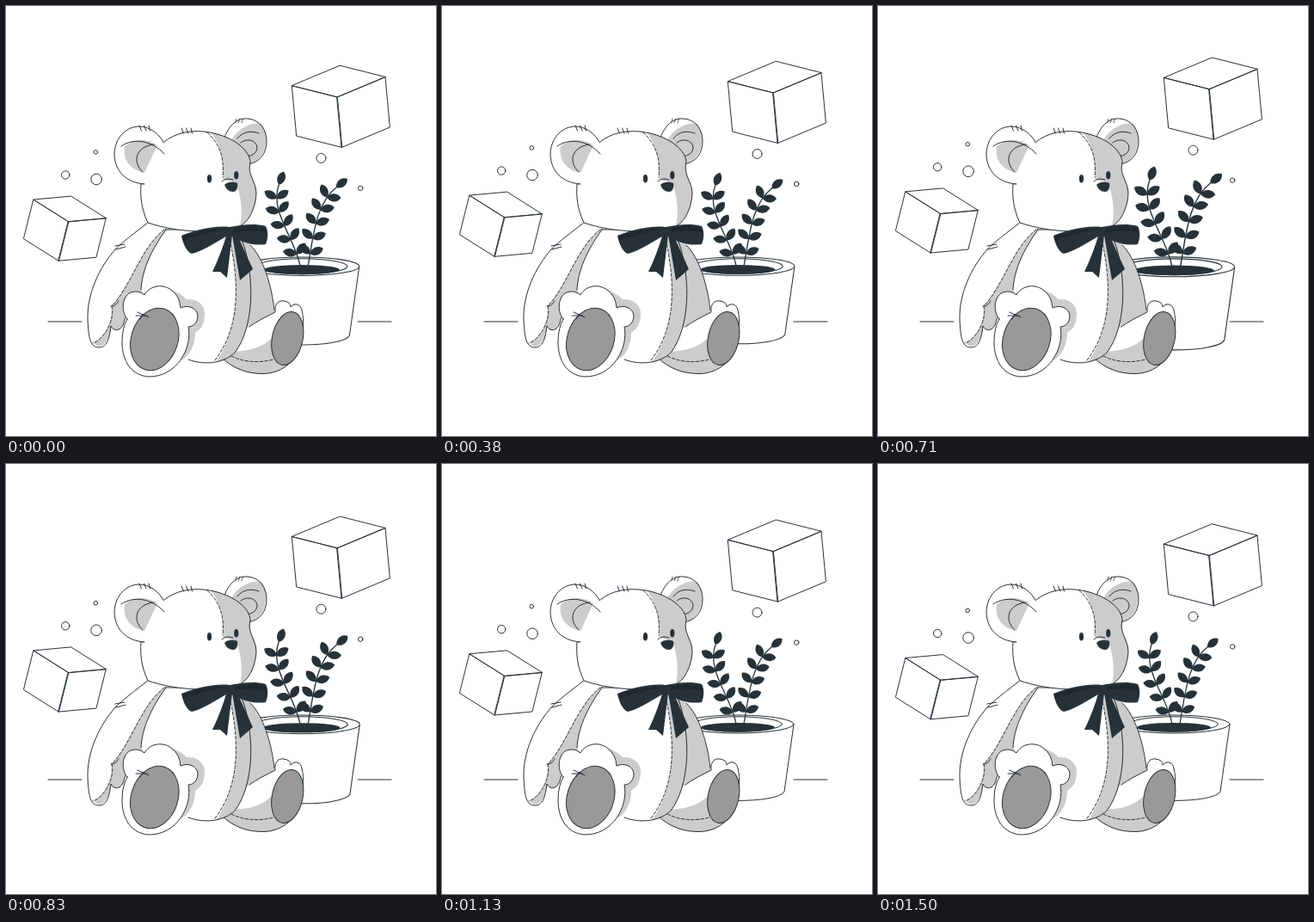
An HTML page for the animation above (1540 ms loop, 500x500 px).

```html
<!DOCTYPE html>
<html lang="en">
<head>
<meta charset="utf-8">
<title>Teddy bear</title>
<style>
  html, body { margin: 0; width: 100%; height: 100%; overflow: hidden; background: #fff; }
  svg { display: block; width: 100%; height: 100%; }
  .line { fill: none; }
  .shade { fill: #000; fill-opacity: .2; stroke: none; }
  .sole { fill: #999; }
  .dark { fill: #263238; stroke: none; }
  .seam { fill: none; stroke-dasharray: 3.5 2.2; }
</style>
</head>
<body>
<svg viewBox="0 0 500 500" fill="#fff" stroke="#263238" stroke-linejoin="round" stroke-linecap="round">
  <defs>
    <path id="tuft" class="line" d="M0 0L2.500 6M5.500 0L8 6M11 0L12.500 6"/>
    <path id="head" d="M184 158C196 148 215 143 237 147C265 152 284 168 284 182C280 196 291 204 291 218C290 237 281 252 272 256C245 265 200 264 165 252C157 235 156 221 157 207H161"/>
    <path id="torso" d="M157 330C158 308 168 285 186 260H270L277 280C289 320 288 372 267 402C254 416 230 418 212 411"/>
    <path id="leg" d="M283 373C291 367 303 361 313 356C312 346 317 342 323 343Q331 344 331 350C336 344 343 347 344 354C347 366 346 380 341 396C336 416 318 427 300 427.500C280 428 264 421 252 410"/>
    <clipPath id="in-head"><use href="#head"/></clipPath>
    <clipPath id="in-torso"><use href="#torso"/></clipPath>
    <clipPath id="in-leg"><use href="#leg"/></clipPath>
  </defs>

  <path class="line" d="M49 367H88M409 367H448"/>

  <g id="floating">
    <g id="cubes"></g>
    <circle cx="69.200" cy="197" r="4.700"/>
    <circle cx="105.100" cy="202" r="6.300"/>
    <circle cx="104.300" cy="170.400" r="2.300"/>
    <circle cx="366.500" cy="177.400" r="5.500"/>
    <circle cx="412.200" cy="212.400" r="2.700"/>
  </g>

  <g id="pot">
    <path d="M279 303L290 380C300 395 390 395 398 381L409 303Z"/>
    <ellipse cx="344" cy="302.500" rx="65" ry="10.500"/>
    <ellipse cx="344" cy="302.500" rx="51.500" ry="8.700"/>
    <ellipse class="dark" cx="344" cy="306.300" rx="43" ry="5.400"/>
    <g id="plant"></g>
  </g>

  <!-- far arm and leg -->
  <path stroke="none" d="M270 262L284 278C299 292 309 325 312 358L270 380Z"/>
  <path class="shade" d="M270 262L284 278C299 292 309 325 312 358L270 380Z"/>
  <path class="line" d="M284 278C299 292 309 325 312 354"/>
  <use href="#leg"/>
  <path class="shade" clip-path="url(#in-leg)" d="M262 402C284 401 298 397 309 386L325 418V430H250V402Z"/>
  <path class="seam" d="M262 407C278 415 295 415 311 411"/>
  <ellipse class="sole" cx="327.300" cy="386.500" rx="17.800" ry="31.500" transform="rotate(12 327.300 386.500)"/>

  <!-- near arm -->
  <path d="M167 250C158 258 140 270 127 283C108 305 94 335 95 365C96 386 98 397 108 397C117 397 120 388 122 372C126 380 136 378 138 364L165 330L186 259"/>
  <path class="shade" d="M184 260C156 282 146 325 122 349C126 366 112 389 102 391C105 399 119 399 122 373C127 380 136 378 138 364L165 330L186 259Z"/>
  <path class="line" d="M122 349Q127 350 131 343M127 279L138 277M128 283L139 280"/>
  <path class="seam" d="M184 260C156 282 146 325 123 349C127 364 114 388 101 392"/>

  <!-- torso -->
  <use href="#torso"/>
  <path class="shade" clip-path="url(#in-torso)" d="M259 262C270 315 275 370 243 416H300V262Z"/>
  <path class="seam" d="M259 266C270 315 275 370 243 412"/>

  <!-- near foot -->
  <path class="shade" d="M190 329Q203 334 210 341C224 340 232 349 231 360C230 375 223 377 220 380C220 395 213 407 204 412L180 380Z"/>
  <path d="M141 364C134 357 134 338 145 333Q154 330 161 336C166 326 181 322 192 330Q202 337 203 351C212 347 222 351 223 360C223 369 217 373 212 373C217 397 199 432 165 431C145 429 135 412 135 391Q135 374 141 364Z"/>
  <ellipse class="sole" cx="172.800" cy="387.500" rx="27.200" ry="37" transform="rotate(18 172.800 387.500)"/>
  <path class="line" d="M151 360H164M153 356L166 362M156 364L160 358"/>

  <!-- ears -->
  <path d="M254 153C260 137 270 130 281 131C296 132 303 145 303 157C303 172 295 182 281 184"/>
  <path class="shade" d="M262 156C268 144 284 134 297 137C307 152 303 180 282 183Z"/>
  <path class="line" d="M269 154C276 145 286 145 294 148M273 159C280 153 291 156 292 164C292 172 284 176 277 174"/>
  <path d="M184 160C178 148 167 140 154 140C137 141 126 156 126 173C127 193 140 205 160 207"/>
  <path class="shade" d="M138 163C149 154 162 153 176 162L161 194C145 191 135 179 138 163Z"/>
  <path class="line" d="M172 161C151 163 146 181 159 193"/>

  <!-- head -->
  <use href="#head"/>
  <path class="shade" clip-path="url(#in-head)" d="M234 140C249 161 254 177 252 201L268 207C275 226 275 246 271 260H300V140Z"/>
  <path class="seam" d="M234 147C249 161 254 177 252 199"/>
  <path class="line" d="M134 163C148 153 170 156 184 172M251 204Q256 199 264 202"/>
  <use href="#tuft" x="155" y="139"/>
  <use href="#tuft" x="204" y="142"/>
  <use href="#tuft" transform="translate(268 131) scale(-.7 .8) translate(-11 0)"/>
  <ellipse class="dark" cx="236.500" cy="200.800" rx="2.600" ry="4.800"/>
  <ellipse class="dark" cx="267.800" cy="196.800" rx="2.600" ry="4.800"/>
  <path class="dark" d="M254 208C257 204 265 204 269 206C270 211 268 216 264 216Q257 216 254 208Z"/>

  <!-- bow -->
  <path class="dark" d="M257 264Q251 286 240 309L249 309L257 316L263 266L272 319L287 306L267 262Z"/>
  <path class="dark" d="M260 257C240 255 220 261 204 267C206 277 210 286 216 288C230 285 246 273 260 266C274 276 290 279 302 277C305 270 305 261 302 256C288 252 272 255 260 257Z"/>
  <path class="shade" d="M204 268Q232 258 257 259Q232 264 206 273ZM266 259Q286 253 303 260V264Q285 259 266 263Z"/>
</svg>
<script>
  const LOOP = 1540, LEAD = 40;
  const byId = id => document.getElementById(id);

  // A box from its front corner and three edge vectors
  function cube([x, y], left, right, down) {
    const corner = (...edges) => edges.reduce(([px, py], [dx, dy]) => [px + dx, py + dy], [x, y]);
    const face = (u, v) => `M${[[x, y], corner(u), corner(u, v), corner(v)].join("L")}Z`;
    return `<path d="${face(left, right)}${face(left, down)}${face(right, down)}"/>`;
  }

  // A cubic stem with leaf pairs, closed by a single leaf at the tip
  function sprig(...points) {
    const [a, b, c, d] = points;
    const mix = (p, q, t) => p.map((v, i) => v + (q[i] - v) * t);
    let svg = `<path class="line" stroke-width="1.3" d="M${a}C${b} ${c} ${d}"/>`;
    for (let i = 0; i < 6; i++) {
      const t = .14 + .172 * i;
      const ab = mix(a, b, t), bc = mix(b, c, t), cd = mix(c, d, t);
      const from = mix(ab, bc, t), to = mix(bc, cd, t);
      const angle = Math.atan2(to[1] - from[1], to[0] - from[0]) * 180 / Math.PI;
      for (const spread of i < 5 ? [-58, 58] : [0])
        svg += `<path class="dark" d="M0 0C4-6 12-6 16 0C12 6 4 6 0 0Z"
          transform="translate(${mix(from, to, t)}) rotate(${angle + spread})"/>`;
    }
    return svg;
  }

  // Linear rise from 0 to 1 and back
  const ramp = (p, from, peak, to) =>
    Math.max(0, Math.min((p - from) / (peak - from), (to - p) / (to - peak)));

  byId("cubes").innerHTML =
    cube([385, 106.4], [-52.7, -13.3], [56, -23.4], [5.4, 58.5]) +
    cube([72.5, 251.2], [-40.7, -25.6], [43.8, -4], [-11.4, 45.6]);
  byId("plant").innerHTML =
    sprig([342, 302], [336, 270], [307, 240], [318, 210]) +
    sprig([351, 302], [357, 270], [359, 232], [383, 213]);

  function draw(time) {
    const p = (time + LEAD) % LOOP / LOOP;
    const rise = 10 * ramp(p, 0, .5, 1);
    const scale = 1 + .1 * (ramp(p, 0, .1, .3) + ramp(p, .4, .5, .6));
    byId("floating").setAttribute("transform", `translate(0 ${-rise})`);
    byId("pot").setAttribute("transform", `translate(344 293.4) scale(${scale}) translate(-344 -293.4)`);
  }

  let start;
  function tick(now) {
    start ??= now;
    draw(now - start);
    requestAnimationFrame(tick);
  }
  draw(0);
  requestAnimationFrame(tick);
</script>
</body>
</html>
```
